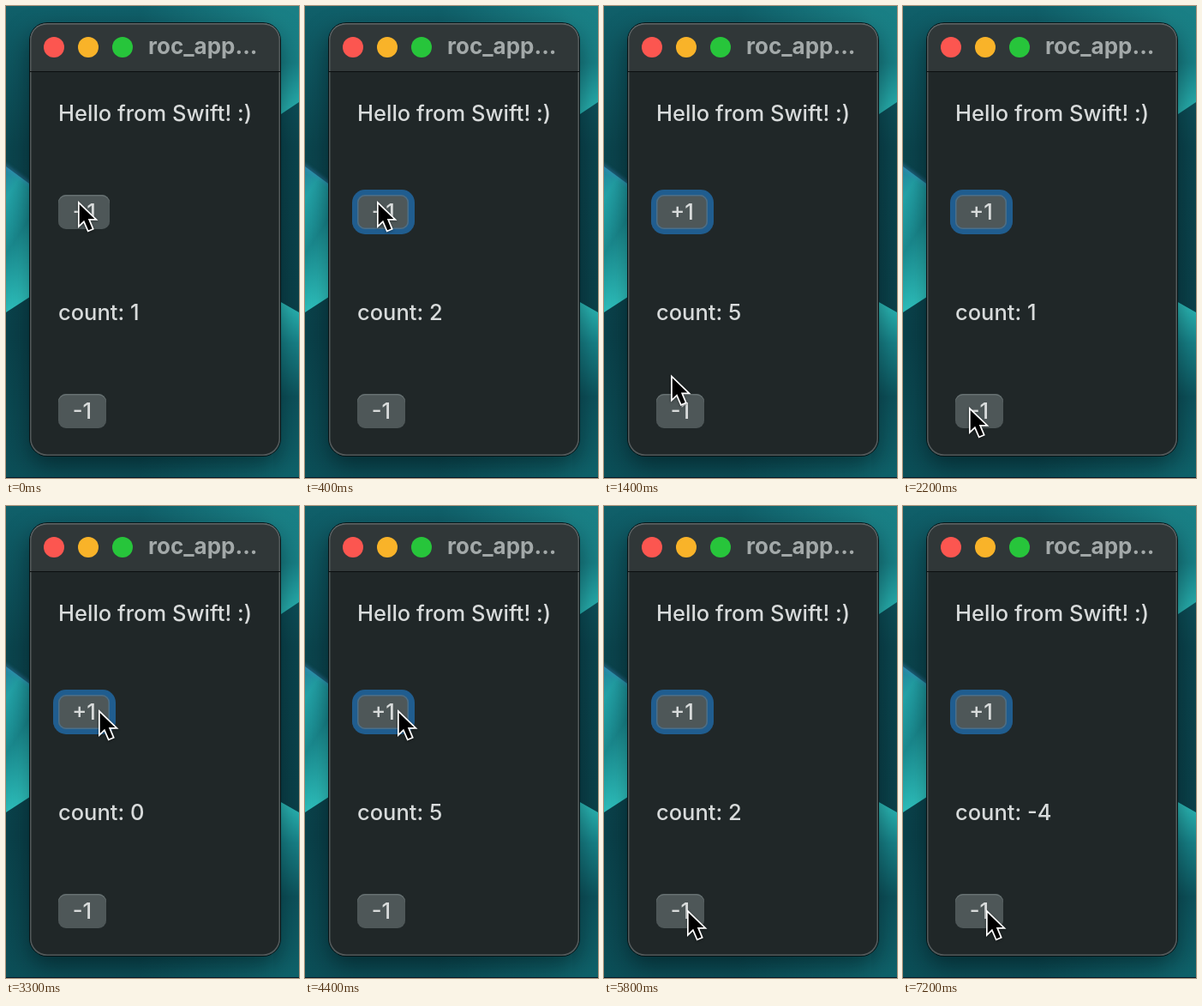
Write an HTML page that moves like this. It is 342 px wide and 550 px high and loops after 7300 ms.

```html
<!DOCTYPE html>
<html lang="en">
<head>
<meta charset="utf-8">
<title>Counter</title>
<style>
  html, body { margin: 0; width: 100%; height: 100%; overflow: hidden; background: #0a3c45; }
  #stage {
    position: relative; width: 342px; height: 550px; overflow: hidden;
    font: 500 25.5px/40px Inter, sans-serif; color: #d8dbdb; white-space: pre;
  }
  #stage > *, .window > * { position: absolute; box-sizing: border-box; }
  .wall { left: 0; top: 0; }
  .window {
    left: 28px; top: 20px; width: 292px; height: 504px; border-radius: 20px;
    background: #202728; overflow: hidden;
    box-shadow: inset 0 0 0 1.5px #535a5b;
  }
  .shade {
    left: 28px; top: 20px; width: 292px; height: 504px; border-radius: 20px;
    box-shadow: 0 0 0 1px #061315, 0 12px 28px rgba(0, 12, 16, .5);
  }
  .bar {
    inset: 0 0 auto; height: 57px; border-bottom: 1.5px solid #0b0f10;
    background: #303738; border-radius: 20px 20px 0 0;
    box-shadow: inset 0 1.5px #606667, inset 1.5px 0 #535a5b, inset -1.5px 0 #535a5b;
  }
  .light { top: 16px; width: 24px; height: 24px; border-radius: 50%; }
  .title { left: 138px; top: 7px; font-size: 26px; font-weight: 700; color: #a3a9a9; }
  .label { left: 33px; }
  .button {
    left: 33px; height: 40px; border-radius: 9px; text-align: center; line-height: 39px;
    background: #4e5758; box-shadow: inset 0 1.5px #667071;
  }
  .ring {
    left: 27px; top: 194px; width: 73px; height: 52px; border-radius: 15px;
    background: #205d8f; visibility: hidden;
  }
  .focus .ring { visibility: visible; }
  .focus .plus { box-shadow: inset 0 0 0 1.5px #4a6f8a; }
  .cursor { left: 0; top: 0; overflow: visible; filter: drop-shadow(0 1px 1.5px rgba(0, 0, 0, .4)); }
</style>
</head>
<body>
<div id="stage">
  <svg class="wall" width="342" height="550">
    <defs>
      <linearGradient id="base" x2="0" y2="1">
        <stop offset="0" stop-color="#10606a"/>
        <stop offset=".3" stop-color="#0b454e"/>
        <stop offset=".7" stop-color="#0a414a"/>
        <stop offset="1" stop-color="#0c4f58"/>
      </linearGradient>
      <linearGradient id="leaf" x2=".3" y2="1">
        <stop offset="0" stop-color="#2483a0"/>
        <stop offset=".2" stop-color="#23a3a8"/>
        <stop offset=".55" stop-color="#1a8b90"/>
        <stop offset="1" stop-color="#2fc6c2"/>
      </linearGradient>
      <linearGradient id="upper" x2="0" y2="1">
        <stop offset="0" stop-color="#1a7f85"/>
        <stop offset=".5" stop-color="#188086"/>
        <stop offset="1" stop-color="#2bbcb9"/>
      </linearGradient>
      <linearGradient id="lower" x2="0" y2="1">
        <stop offset="0" stop-color="#2fc4c0"/>
        <stop offset=".25" stop-color="#178288"/>
        <stop offset=".55" stop-color="#0d535c"/>
        <stop offset="1" stop-color="#0f636b"/>
      </linearGradient>
      <linearGradient id="fade">
        <stop offset=".5" stop-color="#1a7f85" stop-opacity="0"/>
        <stop offset="1" stop-color="#1a7f85"/>
      </linearGradient>
      <linearGradient id="floor">
        <stop offset=".5" stop-color="#0f636b" stop-opacity="0"/>
        <stop offset="1" stop-color="#0f636b"/>
      </linearGradient>
      <filter id="soft"><feGaussianBlur stdDeviation="2"/></filter>
    </defs>
    <path fill="url(#base)" d="M0 0H342V550H0z"/>
    <path fill="url(#fade)" d="M0 0H312V60H0z"/>
    <path fill="url(#floor)" d="M0 490H312V550H0z"/>
    <path fill="url(#leaf)" d="M0 187L34 212V335L0 357z"/>
    <path fill="none" stroke="#3f8fc8" stroke-width="4" opacity=".5" filter="url(#soft)" d="M-4 184L34 212"/>
    <path fill="url(#upper)" d="M312 0H342V112L312 132z"/>
    <path fill="url(#lower)" d="M312 340L342 357V550H312z"/>
    <path fill="#071c2c" d="M0 549H342V550H0z"/>
  </svg>
  <div class="shade"></div>
  <div class="window">
    <div class="bar"></div>
    <div class="light" style="left:16px;background:#fc5650"></div>
    <div class="light" style="left:56px;background:#f9b329"></div>
    <div class="light" style="left:96px;background:#27c53b"></div>
    <div class="title">roc_app...</div>
    <div class="label" style="top:85px">Hello from Swift! :)</div>
    <div class="ring"></div>
    <div class="button plus" style="top:200px;width:60px">+1</div>
    <div class="label" id="count" style="top:317px">count: 1</div>
    <div class="button" style="top:432px;width:56px">-1</div>
  </div>
  <svg class="cursor" id="cursor" width="24" height="38">
    <path d="M1.7 4.1V28L7.2 22.7L12.2 34.2L16.6 32.4L11.8 21H19.3z"
      fill="#000" stroke="#fff" stroke-width="3.4" paint-order="stroke"/>
  </svg>
</div>
<script>
  const LOOP = 7300, STEP = 100;
  const stage = document.getElementById('stage');
  const count = document.getElementById('count');
  const cursor = document.getElementById('cursor');

  // Click times on each button
  const ups = [200, 500, 700, 1000, 3400, 3600, 3900, 4100, 4300];
  const downs = [1600, 1800, 2000, 2200, 2400, 5300, 5500, 5700, 6000, 6200, 6400, 6700, 6900, 7100];

  // Pointer stops: time, x, y
  const stops = [
    [0, 84, 227], [1100, 84, 227], [1500, 77, 467], [2500, 77, 467],
    [3100, 108, 237], [4400, 108, 237], [4800, 101, 501], [5200, 97, 470], [LOOP, 97, 470]
  ];

  const ease = p => p * p * (3 - 2 * p);
  const before = (times, t) => times.filter(c => c <= t).length;

  function pointerAt(t) {
    const i = stops.findIndex(s => s[0] > t);
    const [t0, x0, y0] = stops[i - 1], [t1, x1, y1] = stops[i];
    const p = ease((t - t0) / (t1 - t0));
    return [x0 + (x1 - x0) * p, y0 + (y1 - y0) * p];
  }

  function draw(now) {
    const t = Math.floor(now % LOOP / STEP) * STEP;
    const [x, y] = pointerAt(t);
    cursor.style.transform = `translate(${x}px, ${y}px)`;
    count.textContent = 'count: ' + (1 + before(ups, t) - before(downs, t));
    stage.classList.toggle('focus', t >= 100);
  }

  const start = performance.now();
  function tick() {
    draw(performance.now() - start);
    requestAnimationFrame(tick);
  }
  tick();
</script>
</body>
</html>
```
